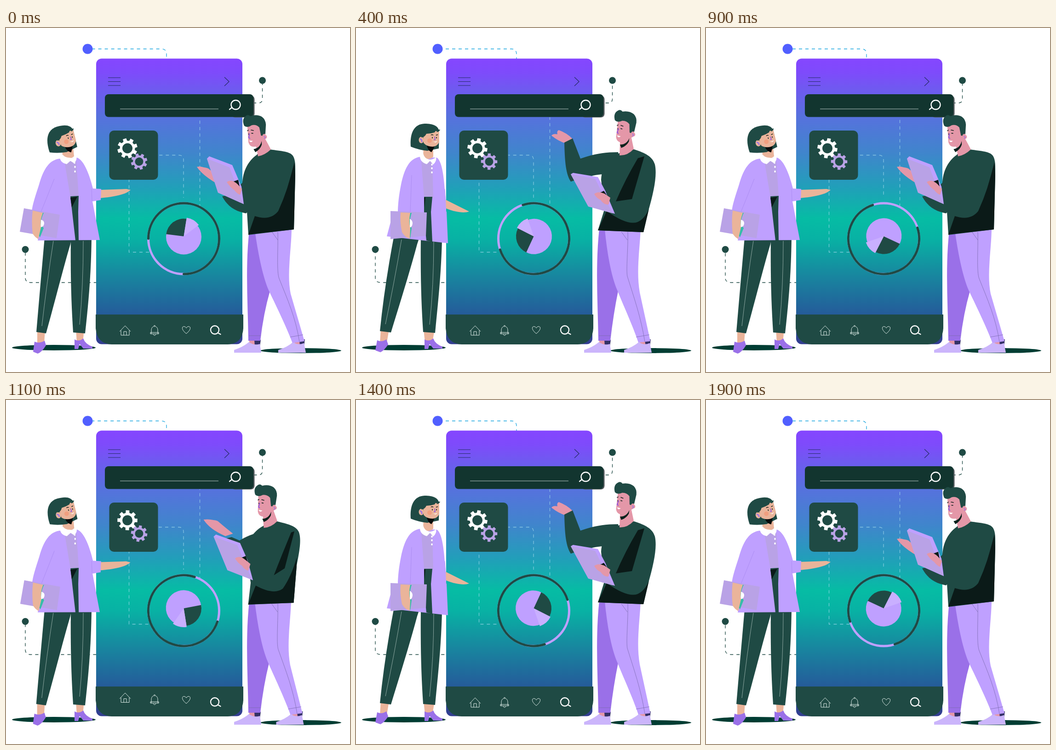
An HTML page for the animation above (2 s loop, 748 by 748 pixels).

```html
<!DOCTYPE html>
<html lang="en">
<head>
<meta charset="utf-8">
<title>App team</title>
<style>
html, body { margin: 0; width: 100%; height: 100%; overflow: hidden; background: #fff; }
svg { display: block; width: 100vw; height: 100vh; }
.dash { fill: none; stroke-width: 1.3; stroke-dasharray: 7 7; }
.thin { fill: none; stroke: #dfeee9; stroke-width: 1; }
.bold { fill: none; stroke: #fff; stroke-width: 2.3; stroke-linecap: round; }
.mark { fill: none; stroke: #252c66; stroke-width: 1.2; }
</style>
</head>
<body>
<svg viewBox="0 0 748 748">
  <defs>
    <linearGradient id="screen" x1="0" y1="66" x2="0" y2="688" gradientUnits="userSpaceOnUse">
      <stop offset="0" stop-color="#8546ff"/>
      <stop offset=".05" stop-color="#7e4bfb"/>
      <stop offset=".2" stop-color="#5771de"/>
      <stop offset=".33" stop-color="#4085cc"/>
      <stop offset=".45" stop-color="#219fb9"/>
      <stop offset=".56" stop-color="#06bca4"/>
      <stop offset=".63" stop-color="#08b2a4"/>
      <stop offset=".76" stop-color="#18869f"/>
      <stop offset=".87" stop-color="#22639b"/>
      <stop offset="1" stop-color="#323b90"/>
    </linearGradient>
  </defs>

  <path class="dash" data-c="1.4" stroke="#1ba6e0" d="M188 45.5H338Q349 45.5 349 57V67"/>
  <path class="dash" data-c="3" stroke="#1f4a44" d="M557.500 120V154Q557.500 163 549 163H539"/>
  <path class="dash" data-c="0" stroke="#1f4a44" d="M42 488V543Q42 553.500 54 553.500H197"/>
  <circle cx="177.500" cy="45.500" r="11" fill="#515fff"/>
  <circle cx="557.500" cy="114" r="7.500" fill="#1f4a44"/>
  <circle cx="42" cy="481.500" r="7.500" fill="#1f4a44"/>
  <ellipse cx="104" cy="695" rx="91" ry="6" fill="#003d33"/>
  <ellipse cx="641" cy="701.500" rx="88" ry="5.500" fill="#003d33"/>

  <rect x="196" y="66.500" width="318" height="621" rx="12" fill="url(#screen)"/>
  <path fill="#1f4a44" d="M195 623H516V653Q514 687 482 688H230Q198 687 195 653Z"/>
  <path class="mark" d="M222 108H249M222 116.500H249M222 125H249M475 107L485 116.500L475 126"/>

  <g stroke="#9fd8ea" opacity=".75">
    <path class="dash" data-c="-2.3" d="M331 276.500H376Q386 276.500 386 287V369"/>
    <path class="dash" data-c="7.2" data-dir="-1" d="M421.500 194V387"/>
    <path class="dash" data-c="2" d="M267.500 330V487.500H312"/>
  </g>

  <rect x="490" y="147" width="50.500" height="47.500" rx="8" fill="#53595d"/>
  <rect x="215" y="144" width="323" height="49.500" rx="8" fill="#12352f"/>
  <path d="M248 176H462" stroke="#b8c9c5" stroke-width="1.200"/>
  <path class="bold" d="M491 173L486 177"/>
  <circle class="bold" cx="499.500" cy="167" r="10"/>

  <rect x="224.500" y="223" width="106" height="107" rx="10" fill="#1f4a44"/>
  <g id="gears"></g>

  <circle cx="386.500" cy="458" r="77" fill="none" stroke="#bfa0ff" stroke-width="5"/>
  <path id="arc" fill="none" stroke="#1f4a44" stroke-width="5" stroke-linecap="round" d="M309.500 458A77 77 0 1 1 386.500 535"/>
  <g id="pie"><circle cx="386.500" cy="454" r="38.500" fill="#bfa0ff"/></g>

  <g id="icons">
    <path class="thin" d="M247 660L259 647.500L271 660M250 657.500V668H268V657.500M256 668V660H262V668"/>
    <path class="thin" d="M314 665H332M316 665V657C316 646 330 646 330 657V665M314 665V662H332V665M321 648Q323 645 325 648M320 666Q323 671 326 666"/>
    <path class="thin" d="M392 664.500C381 656 382 649 387 649C390 649 392 652 392 652.500C392 652 394 649 397 649C402 649 403 656 392 664.500Z"/>
    <path class="bold" d="M463 656.500A9 9 0 1 1 445 656.500A9 9 0 1 1 463 656.500M461 663L466.500 666"/>
  </g>

  <g id="woman"></g>
  <g id="womanHead">
    <path fill="#1f4a44" d="M119 258C117 234 123 209 149 208C169 208 178 213 181 224L180 262L155 267Q136 265 119 258Z"/>
    <path fill="#080c0b" d="M154 256L171 257Q167 266 164 270Q157 267 154 256Z"/>
    <path fill="#eab49a" d="M146 228L181 223V247Q178 257 167 258Q154 258 147 250Z"/>
    <ellipse cx="142" cy="243.500" rx="5.500" ry="7" fill="#eab49a"/>
    <path d="M139 241Q144 242 143 248" stroke="#9a70e8" stroke-width="2.500" fill="none"/>
    <circle cx="160" cy="245" r="5" fill="#f09f7f"/>
    <path fill="#1f4a44" d="M142 236L148 222L183 221Q181 226 176 226L174 222L171 227L163 229L153 230Q150 237 142 238Z"/>
    <path d="M163 233Q165 231 168 233M174 233L178 232M166 237V240M175 237V240" stroke="#16211f" stroke-width="1.600" fill="none"/>
    <path d="M171 236L172 243L169 243" stroke="#8d50e0" stroke-width="1.500" fill="none"/>
    <path fill="#fff" d="M167 246Q173 249 176 245Q175 252 167 246Z"/>
  </g>

  <g id="man"></g>
  <g id="manHead">
    <path fill="#e497a8" d="M556 204L553 244Q555 257 570 255Q582 254 586 244Q594 241 592 232L590 204Z"/>
    <path fill="#1f4a44" d="M549 207Q545 193 554 187Q560 182 565 188Q580 185 590 193Q597 200 596 211L592 231Q587 229 585 234L582 233L581 215Q575 207 565 208Q555 213 549 207Z"/>
    <circle cx="590" cy="237" r="4.500" fill="#e497a8"/>
    <path d="M588 235L591 238L588 241" fill="none" stroke="#9a70e8" stroke-width="1.300"/>
    <path fill="#08211c" d="M562 260Q576 260 582 245L581 253Q576 263 565 267Z"/>
    <path d="M562 218L568 220M554 219L557 217M562 225L566 226M556 225V227" stroke="#16211f" stroke-width="1.600"/>
    <path d="M558 225L555 234L558 236" fill="none" stroke="#8d50e0" stroke-width="1.800"/>
    <path fill="#fff" d="M555 240L563 242Q557 247 555 240Z"/>
  </g>
</svg>

<script>
const $ = id => document.getElementById(id);
const GREEN = '#1f4a44', BLACK = '#0b1a18', LILAC = '#bfa0ff', VIOLET = '#9a70e8',
      PALE = '#b9a2e6', SHOE = '#cbb5fb', SKIN = '#eab49a', ROSE = '#e497a8', NAVY = '#343166';

function add(parent, d, fill, stroke) {
  const el = document.createElementNS('http://www.w3.org/2000/svg', 'path');
  el.setAttribute('d', d);
  el.setAttribute('fill', fill);
  if (stroke) {
    el.setAttribute('stroke', stroke);
    el.setAttribute('stroke-width', 0.8);
  }
  parent.append(el);
  return el;
}

// Blends the numbers of two paths that share the same commands.
function mix(a, b, k) {
  if (a === b || k === 0) return a;
  const to = b.match(/[\d.]+/g);
  let i = 0;
  return a.replace(/[\d.]+/g, n => (+n + (to[i++] - n) * k).toFixed(2));
}

// Woman: [fill, arm raised, arm lowered, stroke]
const womanParts = [
  [SKIN, 'M68 655L85 655L83 686L68 686Z', 'M54 655L72 655L67 684L52 684Z'],
  [SKIN, 'M152 655L170 655L167 684L154 684Z', 'M147 655L171 655L166 684L150 684Z'],
  [VIOLET, 'M62 682Q72 687 84 680L87 690Q78 705 69 708L59 704Z', 'M46 679Q56 684 66 677L70 688Q61 702 53 705L42 701Z'],
  [VIOLET, 'M149 677Q158 683 168 675Q172 687 188 693L188 697L168 697L160 687L157 698L149 698Z'],
  [GREEN, 'M84 455L143 455L140 470C125 520 105 600 87 664L66 661Q72 590 84 455Z', 'M83 450L138 455L133 470C117 530 95 600 76 662L52 659Q62 560 83 450Z'],
  [GREEN, 'M141 455L186 455C185 540 179 600 172 664L146 662C142 600 140 540 141 455Z', 'M141 455L187 460C185 540 178 600 172 663L146 661C142 600 140 540 141 455Z'],
  ['none', 'M103 463Q88 560 78 648', 'M99 460Q82 560 64 644', '#a9bfb9'],
  ['none', 'M168 463Q168 560 160 645', 'M169 465Q169 560 160 645', '#a9bfb9'],
  [SKIN, 'M204 352L262 350L271 352C262 361 240 367 204 370Z', 'M192 372L226 389L246 399C236 403 216 401 193 391Z'],
  [LILAC, 'M118 284C95 286 82 305 72 340C64 365 57 385 56 400L80 402L69 462L204 461L188 377L206 374L207 350L189 349C182 320 170 288 155 282Z',
    'M140 280C115 283 105 308 98 340C93 365 91 385 91 402L80 404L67 453L200 468L197 400L196 398L195 374L194 368C192 330 188 290 176 282Z'],
  [PALE, 'M127 290L153 290L158 366L140 367Z', 'M142 290L166 290L168 368L148 368Z'],
  [GREEN, 'M140 366L158 365L157 400L158 462L151 462L145 410Z', 'M148 367L166 367L163 400L166 465L153 462L148 410Z'],
  [BLACK, 'M140 369L155 367L143 390Z', 'M148 369L151 368L149 390Z'],
  ['none', 'M186 350L187 376', 'M193 350L195 374', '#a98af0'],
  ['none', 'M105 328L76 400', 'M121 320L118 400', '#a98af0'],
  [PALE, 'M39 392L117 406L110 457L30 443Z', 'M75 398L154 401L152 452L75 459Z'],
  ['#35bda9', 'M72 402L82 402Q71 424 82 435L74 455L70 450Z', 'M113 402L121 402Q114 424 121 435L118 457L113 450Z'],
  ['#fff', 'M76 417Q83 418 83 425Q82 433 75 433Z', 'M117 415Q123 418 123 425Q122 433 117 434Z'],
  [SKIN, 'M58 397L80 402Q73 420 76 434L70 459Q62 454 58 447Q55 420 58 397Z', 'M97 401L118 402Q114 420 118 436L117 458Q107 456 100 444Q95 420 97 401Z'],
  [SKIN, 'M124 258L146 260L148 279Q134 290 122 279Z', 'M147 255L168 257L168 280Q156 290 146 279Z'],
  ['#fff', 'M117 281Q118 293 132 296L140 289L148 294Q155 287 153 280Q147 284 138 282Q128 282 123 275Z', 'M139 280Q140 292 154 296L161 289L168 297Q176 289 174 281Q167 287 159 286Q149 284 146 273Z'],
  ['#fff', ...[[149, 165, 293, 297], [150, 165, 302, 305], [150, 165, 312, 314]].reduce((out, [px, qx, py, qy]) => {
    const dot = (x, y) => `M${x - 1.5} ${y - 2}L${x + 1.5} ${y - 2}L${x + 1.5} ${y + 2}L${x - 1.5} ${y + 2}Z`;
    return [out[0] + dot(px, py), out[1] + dot(qx, qy)];
  }, ['', ''])]
];

// Man: [fill, reading, waving out, leaning, waving in, stroke]
const manParts = [
  [ROSE, 'M529 675L541 675L541 690L529 690Z'],
  [NAVY, 'M540 678L554 678L552 692L541 692Z'],
  [ROSE, 'M627 678L640 678L640 692L627 692Z', 'M617 678L630 678L630 692L617 692Z'],
  [NAVY, 'M638 679L650 677L648 692L639 692Z', 'M628 679L641 677L639 692L630 692Z'],
  [SHOE, 'M496 706L496 700Q515 694 528 683Q540 691 552 687L555 706Z'],
  [SHOE, 'M592 706L592 700Q612 694 624 683Q636 691 648 685L652 706Z', 'M583 706L583 700Q602 694 615 683Q626 691 639 685L643 706Z'],
  [VIOLET, 'M529 440C520 520 526 600 527 680L553 680Q560 620 574 572L558 500L546 440Z', 'M529 436C520 520 526 600 527 680L553 680Q560 620 570 572L558 500L546 436Z'],
  [LILAC, 'M541 440L621 434C621 480 610 535 619 578L649 681L623 685C610 650 583 595 571 570C558 540 548 490 541 440Z',
    'M541 438L619 438C617 480 609 530 617 575L640 681L614 684C603 650 580 600 568 570C555 540 546 490 541 438Z'],
  ['none', 'M591 443C592 480 588 530 594 545C612 590 630 630 638 682M618 672L646 667M528 669L554 669M578 443L591 461',
    'M591 443C592 480 587 525 590 540C604 585 620 630 628 682M609 672L638 667M528 669L554 669M577 443L590 461', , , '#7d6bb0'],
  [ROSE, 'M480 350Q430 325 415 302Q422 300 430 303Q440 304 443 308Q455 318 495 345Z',
    'M456 251Q440 246 425 234Q428 229 438 231Q436 224 441 222Q458 228 471 241Z',
    'M465 272Q440 262 430 247Q445 244 455 247Q460 248 464 251Q472 256 476 263Z',
    'M474 242Q455 237 444 218Q460 217 472 219Q478 219 481 221Q488 228 492 236Z'],
  [GREEN, 'M560 300C540 310 530 320 520 330L490 362L470 366C480 385 495 398 522 403Q530 395 535 390L560 340Z',
    'M570 270C530 270 505 278 488 284L471 240L453 249C454 290 456 317 467 334Q500 322 535 318L575 300Z',
    'M580 275C550 280 520 292 488 305L475 261L459 270C456 300 458 335 472 360Q500 345 530 330L575 305Z',
    'M570 270C530 270 512 276 496 281L491 234L471 240C464 270 460 310 467 332Q500 322 535 318L575 300Z'],
  [GREEN, 'M545 276C555 265 568 265 574 264C600 268 617 268 624 278C630 288 629 300 629 320L626 438L527 450L524 400L514 345C513 315 525 290 545 276Z',
    'M573 272C585 262 600 263 605 264C630 272 645 280 650 297C655 320 648 355 635 400L625 444L526 440L540 395L533 330C535 300 545 285 573 272Z',
    'M566 280C575 266 590 267 595 267C620 272 635 280 639 292C645 310 640 350 635 390L625 446L526 445L536 390L530 330C535 300 545 292 566 280Z'],
  [BLACK, 'M527 449L541 409Q575 420 592 398Q614 350 627 292L629 320L626 438Z',
    'M526 440L545 398Q590 430 612 422Q628 415 637 393L635 402L625 444Z',
    'M526 445L545 393Q590 427 608 420Q628 410 641 345L637 385L625 446Z'],
  [BLACK, 'M627 292L627 293Q612 350 600 385L612 360Z', 'M627 279L613 283Q585 330 565 377L600 372Z', 'M616 280L606 286Q585 330 565 373L574 374Z'],
  [LILAC, 'M437 284L442 279L492 298L512 345L517 383L461 358Z', 'M467 318L472 315L526 324L542 354L563 404L505 388Z',
    'M457 303L462 299L516 318L528 345L544 397L488 376Z', 'M466 310L471 306L526 324L538 350L557 401L502 382Z'],
  [PALE, 'M437 284L486 303L515 381L461 358Z', 'M467 318L520 328L558 403L505 388Z',
    'M457 303L511 322L541 396L488 376Z', 'M466 310L520 328L554 400L502 382Z'],
  [BLACK, 'M491 335L505 330L508 345Z', 'M529 359L539 354L547 366Z', 'M516 347L528 341L530 356Z', 'M527 353L538 348L544 360Z'],
  [ROSE, 'M480 335Q490 327 504 340L513 350L509 363Q502 360 496 352Q488 347 480 335Z',
    'M518 361Q526 354 540 360L553 369L549 384Q538 384 532 374Q523 370 518 361Z',
    'M504 348Q515 343 528 352L538 361L533 377Q524 375 518 365Q510 359 504 348Z',
    'M516 354Q525 346 538 356L550 363L545 379Q534 378 530 368Q521 363 516 354Z'],
  [ROSE, 'M543 253L562 238L576 264Q562 277 548 279Z', 'M574 248L597 230L604 263Q590 278 573 277Z', 'M566 250L588 235L593 266Q580 280 565 281Z']
];

const woman = womanParts.map(([fill, up, down = up, stroke]) =>
  ({ el: add($('woman'), up, fill, stroke), up, down }));
const man = manParts.map(([fill, read, out = read, lean = out, wave = out, stroke]) =>
  ({ el: add($('man'), read, fill, stroke), poses: { read, out, lean, wave } }));

const manHeads = { read: [-28, 2, -8], out: [13, -6, 2], lean: [0, 0, 0], wave: [16, -6, 3] };
const manKeys = [[0, 'read'], [200, 'wave'], [400, 'out'], [600, 'wave'], [700, 'lean'], [900, 'read'], [1000, 'read']];
const womanKeys = [[0, 0], [200, .04], [400, 1], [700, .98], [900, 0], [1000, 0]];

function segment(keys, t) {
  const i = keys.findIndex(k => k[0] > t);
  const [t0, from] = keys[i - 1], [t1, to] = keys[i];
  const u = (t - t0) / (t1 - t0);
  return { from, to, k: u * u * (3 - 2 * u) };
}

const polar = (x, y, r, deg) => {
  const a = deg * Math.PI / 180;
  return `${(x + r * Math.cos(a)).toFixed(2)} ${(y + r * Math.sin(a)).toFixed(2)}`;
};
const sector = (x, y, r, a, b) => `M${x} ${y}L${polar(x, y, r, a)}A${r} ${r} 0 0 1 ${polar(x, y, r, b)}Z`;

function gear(x, y, outer, inner, hole, fill) {
  const points = [];
  for (let a = 0; a < 360; a += 45) {
    points.push(polar(x, y, inner, a - 14), polar(x, y, outer, a - 10), polar(x, y, outer, a + 10), polar(x, y, inner, a + 14));
  }
  const ring = `M${x - hole} ${y}a${hole} ${hole} 0 1 0 ${2 * hole} 0a${hole} ${hole} 0 1 0 ${-2 * hole} 0Z`;
  const el = add($('gears'), `M${points.join('L')}Z${ring}`, fill);
  el.setAttribute('fill-rule', 'evenodd');
  return deg => el.setAttribute('transform', `rotate(${deg} ${x} ${y})`);
}

const turnBig = gear(264, 261.5, 22, 16.5, 11, '#fff');
const turnSmall = gear(289.5, 290.5, 18, 13.5, 9, PALE);
add($('pie'), sector(386.5, 453, 38.5, 187, 279), GREEN);
add($('pie'), sector(386.5, 453, 41, 279, 323), '#c9afff');

const dashes = document.querySelectorAll('.dash');
const icons = [...$('icons').children];
const hops = [[130, 130, 12], [190, 170, 13], [210, 180, 14], [260, 140, 13]];   // centre, half width, height

function draw(t) {
  const half = t % 1000, spin = t * .18;
  $('arc').setAttribute('transform', `rotate(${spin} 386.5 458)`);
  $('pie').setAttribute('transform', `rotate(${-spin} 386.5 453)`);
  turnBig(spin + 28);
  turnSmall(-spin + 28);

  dashes.forEach(el => {
    const offset = (el.dataset.dir || 1) * (14 * half / 1000 + +el.dataset.c);
    el.setAttribute('stroke-dashoffset', offset);
  });

  icons.forEach((el, i) => {
    const [centre, width, height] = hops[i];
    const d = Math.min(1, Math.abs(t % 500 - centre) / width);
    el.setAttribute('transform', `translate(0 ${-height * Math.cos(d * Math.PI / 2) ** 2})`);
  });

  const w = segment(womanKeys, half);
  const low = w.from + (w.to - w.from) * w.k;
  woman.forEach(p => p.el.setAttribute('d', mix(p.up, p.down, low)));
  $('womanHead').setAttribute('transform', `translate(${-30 * (1 - low)} ${3 * (1 - low)}) rotate(${-15 * (1 - low)} 158 240)`);

  const m = segment(manKeys, half);
  man.forEach(p => p.el.setAttribute('d', mix(p.poses[m.from], p.poses[m.to], m.k)));
  const [x, y, turn] = manHeads[m.from].map((v, i) => v + (manHeads[m.to][i] - v) * m.k);
  $('manHead').setAttribute('transform', `translate(${x} ${y}) rotate(${turn} 574 230)`);
}

const start = performance.now();
function tick() {
  const t = (performance.now() - start) % 2000;
  draw(Math.floor(t / 100) * 100);
  requestAnimationFrame(tick);
}
tick();
</script>
</body>
</html>
```
